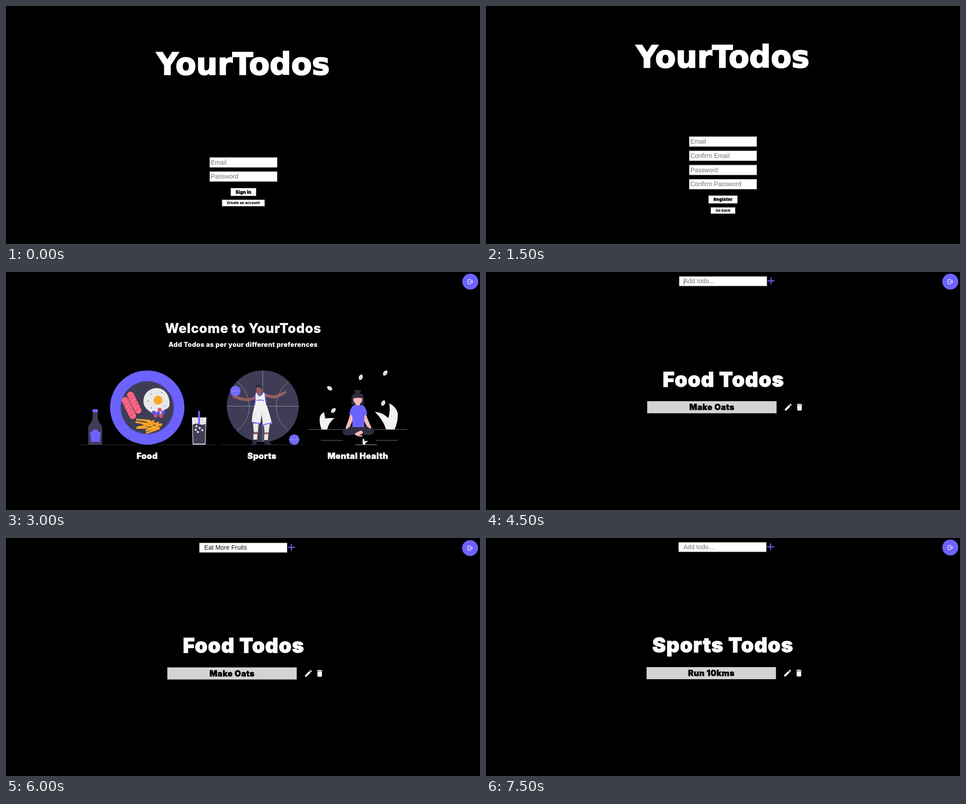
These frames come from a looping animation (1055 by 531 pixels, 8 s). An HTML page with a canvas:

```html
<!DOCTYPE html>
<html lang="en">
<head>
<meta charset="utf-8">
<title>Todo app tour</title>
<style>
  html, body { margin: 0; width: 100%; height: 100%; overflow: hidden; background: #000; }
  canvas { display: block; }
</style>
</head>
<body>
<canvas id="stage" width="1055" height="531"></canvas>
<script>
const ctx = document.getElementById('stage').getContext('2d');
const PURPLE = '#6c63ff', SLATE = '#3f3d56', INK = '#2f2e41', PALE = '#e8e8e8';
const PINK = '#ff6584', AMBER = '#f9a826', SKIN = '#ffb8b8', BROWN = '#965d61';
const HEAVY = 'Inter, "Open Sans", sans-serif';
const WIDE = '"DejaVu Sans", sans-serif';
const PLAIN = '"Liberation Sans", Arial, sans-serif';

function fill(d, color) {
  ctx.fillStyle = color;
  ctx.fill(new Path2D(d));
}

function line(d, color, width = 1, cap = 'butt') {
  ctx.strokeStyle = color;
  ctx.lineWidth = width;
  ctx.lineCap = cap;
  ctx.lineJoin = 'round';
  ctx.stroke(new Path2D(d));
}

function dot(x, y, r, color, ry = r) {
  ctx.fillStyle = color;
  ctx.beginPath();
  ctx.ellipse(x, y, r, ry, 0, 0, Math.PI * 2);
  ctx.fill();
}

function rect(x, y, w, h, color) {
  ctx.fillStyle = color;
  ctx.fillRect(x, y, w, h);
}

function box(x, y, w, h) {
  rect(x, y, w, h, '#a6a6a6');
  rect(x + 1, y + 1, w - 2, h - 2, '#fff');
}

function at(x, y, angle, scale, draw) {
  ctx.save();
  ctx.translate(x, y);
  ctx.rotate(angle);
  ctx.scale(scale, scale);
  draw();
  ctx.restore();
}

// Centred text, thickened by an outline given in em.
function thickText(text, x, y, size, color, outline) {
  ctx.textAlign = 'center';
  ctx.fillStyle = ctx.strokeStyle = color;
  ctx.lineWidth = size * outline;
  ctx.lineJoin = 'miter';
  ctx.miterLimit = 3;
  ctx.fillText(text, x, y);
  if (outline) ctx.strokeText(text, x, y);
}

function label(text, x, y, size, color = '#fff', weight = 900) {
  const gap = size * 0.026;
  ctx.font = `${weight} ${size}px ${HEAVY}`;
  ctx.letterSpacing = gap + 'px';
  thickText(text, x + gap / 2, y, size, color, weight === 900 ? 0.028 : 0.012);
  ctx.letterSpacing = '0px';
}

function brand(x, y) {
  const size = 67;
  ctx.font = `bold ${size}px ${WIDE}`;
  thickText('YourTodos', x, y, size, '#fff', 0.035);
}

function field(x, y, w, h, text, pad = 3, color = '#757575') {
  box(x, y, w, h);
  ctx.font = `13.9px ${PLAIN}`;
  ctx.textAlign = 'left';
  ctx.fillStyle = color;
  ctx.fillText(text, x + pad, y + h / 2 + 4.8);
}

function button(x, y, w, h, text, size, weight) {
  box(x, y, w, h);
  label(text, x + w / 2, y + h / 2 + size * 0.36, size, '#000', weight);
}

function signIn() {
  brand(527.8, 152.5);
  field(453, 337.5, 151, 23, 'Email');
  field(453, 369, 151, 23, 'Password');
  button(500, 406, 57, 18, 'Sign In', 9.8, 900);
  button(480.5, 432, 95.5, 15, 'Create an account', 7.8, 800);
}

function register() {
  brand(527, 137);
  ['Email', 'Confirm Email', 'Password', 'Confirm Password']
    .forEach((text, i) => field(452, 291 + i * 31.7, 151, 23, text));
  button(495, 422.7, 65, 18, 'Register', 9.5, 900);
  button(500, 449, 55, 14.6, 'Go back', 7.8, 800);
}

function logout(x, y) {
  dot(x, y, 17.8, PURPLE);
  at(x, y, 0, 1, () => {
    line('M1.2-2.8V-3.6Q1.2-4.6 .2-4.6H-4Q-5-4.6-5-3.6V3.8Q-5 4.8-4 4.8H.2Q1.2 4.8 1.2 3.8V3', '#fff', 1.2);
    line('M-1.6 .1H5.4M3-2.3L5.4 .1L3 2.5', '#fff', 1.2, 'round');
  });
}

function sausage(x, y) {
  at(x, y, -0.46, 1, () => {
    line('M0-19V19', PINK, 15, 'round');
    for (let i = -2; i <= 2; i++) line(`M-7 ${i * 8.5 + 1}Q0 ${i * 8.5 - 3} 7 ${i * 8.5 - 2}`, '#a8465f', 0.8);
    dot(-3, -12, 0.9, SLATE);
    dot(3, 4, 0.9, SLATE);
    dot(-2, 17, 0.9, SLATE);
  });
}

function food() {
  line('M162 385.5H466', '#302f40');

  fill('M193 313H204V324Q205 334 211 340Q214 344 214 350V382Q214 385 211 385H186Q183 385 183 382V350Q183 344 186 340Q192 334 193 324Z', SLATE);
  fill('M193.5 306H203.5Q204.5 306 204.5 307V313H192.5V307Q192.5 306 193.5 306Z', PURPLE);
  fill('M187 357H191.5A7.8 7.8 0 0 1 206.5 357H211L208.5 379H189.5Z', PURPLE);

  dot(314.4, 302.4, 82.7, PURPLE);
  dot(314.4, 302.4, 60, '#564fc8');
  dot(314.4, 302.6, 58.4, SLATE);
  sausage(285.5, 291.5);
  sausage(273.5, 303.5);

  fill('M334 259C349 258 361 270 363 284C366 297 363 304 356 306C350 307 352 313 346 316C337 320 325 316 317 309C309 303 305 295 306 286C307 271 319 260 334 259Z', PALE);
  dot(338.5, 286, 10, AMBER);
  [[324, 272], [347, 269], [323, 303], [316, 288], [353, 299]]
    .forEach(([x, y]) => dot(x, y, 1, SLATE));
  [[342, 307.5], [333, 320], [345, 321]].forEach(([x, y]) => dot(x, y, 4.5, '#d94f70'));
  [[329, 314], [338, 315.5], [350, 313.5]].forEach(([x, y]) => dot(x, y, 4.6, '#5d56dc'));

  [[306, 330.5, .08], [304, 337, .15], [309, 344, -.12], [306, 348, .02],
   [321, 335, .3], [325, 340, -.25], [318, 342, .25], [331, 339, .22],
   [332, 345, -.4], [326, 350, -.25], [327, 354, -.35], [316, 339, -.5]]
    .forEach(([x, y, a]) => at(x, y, a, 1, () => {
      rect(-16, -1.8, 32, 3.6, AMBER);
      rect(-16, 1.4, 32, 0.6, '#d88d1b');
    }));

  fill('M413.8 324.5H446L444 385H415.5Z', PALE);
  fill('M415.5 341Q422 336.5 430 339.5Q438 342 444.2 339L442.6 383H417Z', SLATE);
  rect(427.5, 310, 4.3, 29.5, PURPLE);
  [[424, 344, .1], [431, 348, .6], [422, 352, .8], [437, 353, .4], [427, 357, .5]]
    .forEach(([x, y, a]) => at(x, y, a, 1, () => rect(-2.1, -2.1, 4.2, 4.2, PALE)));
  [[420, 330], [437, 329], [441, 335], [422, 336]].forEach(([x, y]) => dot(x, y, 0.7, SLATE));
}

function ball(x, y) {
  dot(x, y, 11.5, PURPLE);
  at(x, y, 0, 1, () =>
    line('M0-11.5V11.5M-11.5 0H11.5M-8-8Q-1 0-8 8M8-8Q1 0 8 8', '#aaa5e8', 0.7));
}

function sports() {
  line('M477 385.5H662', '#302f40');
  dot(571.5, 299.5, 80, SLATE);
  line('M571.5 219.5V379.5M491.5 299.5H651.5M514 244Q541 267 541.5 299.5Q541 333 514 355M629 244Q602 267 601.5 299.5Q602 333 629 355', '#aaa9b4', 0.8);

  line('M559 278Q549 284 537 285Q523 284 509 278', BROWN, 6.5, 'round');
  line('M507 278L503 274M508 277L506 272', BROWN, 2.5, 'round');
  ball(510.5, 265.5);
  line('M576 275Q588 278 598 279Q609 275 617 271', BROWN, 6.5, 'round');
  line('M616 271L622 267M617 272L623 269', BROWN, 3, 'round');

  fill('M559 260H569V270L573 274L565 280L557 274Z', BROWN);
  fill('M550 336H564L562 350L559 377H550L551 355Z', BROWN);
  fill('M573 336H588L585 356L582 378H574L575 355Z', BROWN);
  fill('M550.5 362H559.5L558.5 375H551Z', PALE);
  fill('M575 362H584L582.5 376H574.5Z', PALE);
  fill('M550 338H562L560.5 357H551.5Z', PALE);
  fill('M574 338H587L584.5 358H575.5Z', PALE);
  fill('M551 374H558.5Q560 383 556 385H547.5Q548 379 551 374Z', INK);
  fill('M574.5 375H582Q587 379 591 384L590 385.5H577Q574 381 574.5 375Z', INK);

  fill('M557 268L560 273Q565 281 570 273L573 268L577 272Q578 289 580 303H552Q556 290 554 278Z', '#f0f0f0');
  line('M557 268L560 273Q565 281 570 273L573 268', PURPLE, 1.4);
  line('M554.5 276Q556 288 553 298M576.5 271Q577 284 579 294', PURPLE, 2);
  line('M558 287Q565 284 574 287', PURPLE, 2.2);
  fill('M554 297H580Q587 316 592 338L572 343L569 318L566 338L547 335Q548 314 554 297Z', '#f0f0f0');
  line('M547 335L566 338M572 341L592 336', PURPLE, 2.2);
  line('M569 308V322M551 326L556 313', '#c9c9d0', 0.7);

  dot(563.5, 262.5, 6.6, BROWN, 8);
  fill('M555 261Q553 252 562 250.5Q570 250 571 258L570.5 264Q568 257 562 257Q557 257 555 261Z', INK);
  ball(641.5, 374);
}

function leaf(x, y, angle) {
  at(x, y, angle, 1, () => {
    fill('M0 7C-6 3-5-4 0-7C5-4 6 3 0 7Z', '#f2f2f2');
    line('M0 8V-2', '#77777f', 0.8);
  });
}

function calm() {
  line('M673 351.5H893', '#77777b');
  line('M701 375.5H750M823 375.5H872', '#77777b');
  line('M777 385.5H826', '#b0b0b0');
  fill('M702 351Q696 333 699 322Q702 315 708 313Q709 321 711 327Q719 325 731 326Q718 336 715 351Z', '#f2f2f2');
  fill('M846 351Q840 331 821 312Q838 313 851 326Q856 309 853 293Q868 300 872 315Q873 333 865 351Z', '#f2f2f2');
  fill('M795 385Q792 377 795 371Q798 373 798 378Q801 376 806 377Q800 380 799 385Z', '#f2f2f2');
  leaf(720.5, 259.5, -0.95);
  leaf(789.5, 235, 0.35);
  leaf(844, 225.5, 0.65);
  leaf(728.5, 309, 0.75);
  leaf(839.5, 292.5, 0.45);

  dot(782.5, 268, 6, INK, 5);
  dot(777.5, 265.5, 2.5, INK);
  dot(787.5, 265.5, 2.5, INK);
  fill('M769 296V283Q769 270 783 270Q796.5 270 796.5 283V296Z', INK);
  fill('M778 290H788V299H778Z', SKIN);
  dot(783, 284.5, 10, SKIN);
  fill('M772 282Q773 273 783 273Q793 273 794 282Q783 279 772 282Z', INK);

  fill('M771 343H797Q812 344 818 350Q822 360 812 363Q797 365 783 359Q768 366 755 364Q747 361 750 352Q756 346 771 343Z', INK);
  fill('M768 311L776 315Q773 330 766 344L758 351L756 347Q763 330 768 311Z', SKIN);
  fill('M799 311L792 315Q795 330 803 344L811 350L813 346Q805 330 799 311Z', SKIN);
  fill('M775 297H793Q801 299 804 318L798 320L797 346H771L771 320L764 318Q767 300 775 297Z', PURPLE);
  line('M774 312L773 325M794 312L795 325', '#554dcc', 0.7);
  fill('M776 361Q784 355 791 354Q796 357 793 361L785 364Q791 363 795 366Q786 369 777 363Z', SKIN);
}

function welcome() {
  logout(1033.4, 21.5);
  label('Welcome to YourTodos', 527.5, 135.7, 29.3, '#fff', 800);
  label('Add Todos as per your different preferences', 527.5, 167, 14.5, '#fff', 800);
  food();
  sports();
  calm();
  label('Food', 314, 416.5, 18.4);
  label('Sports', 569.5, 416.5, 18.4);
  label('Mental Health', 783, 416.5, 18.4);
}

const PENCIL = 'M3 17.25V21h3.75L17.81 9.94l-3.75-3.75L3 17.25zM20.71 7.04a1 1 0 0 0 0-1.41l-2.34-2.34a1 1 0 0 0-1.41 0l-1.83 1.83 3.75 3.75 1.83-1.83z';
const BIN = 'M6 19c0 1.1.9 2 2 2h8c1.1 0 2-.9 2-2V7H6v12zM19 4h-3.5l-1-1h-5l-1 1H5v2h14V4z';

function todos(title, item, dx, dy, entry) {
  field(429.6 + dx, 9.6 + dy, 196, 22, entry || 'Add todo...', 11.2, entry ? '#111' : '#757575');
  const px = 634.7 + dx, py = 19.9 + dy;
  line(`M${px - 7.8} ${py}H${px + 7.8}M${px} ${py - 7.8}V${py + 7.8}`, PURPLE, 2.2);
  label(title, 528 + dx, 255.5 + dy * 0.6, 45);
  rect(358.7 + dx, 288.2 + dy * 0.5, 288, 27, '#d3d3d3');
  label(item, 502.6 + dx, 308 + dy * 0.5, 18.2, '#000');
  at(662.6 + dx, 291.4 + dy * 0.5, 0, 0.84, () => fill(PENCIL, '#fff'));
  at(687.7 + dx, 291.4 + dy * 0.5, 0, 0.84, () => fill(BIN, '#fff'));
}

function foodEmpty() {
  logout(1033.4, 21.5);
  todos('Food Todos', 'Make Oats', 0, 0);
  rect(440.4, 13, 1, 15.5, '#333');
}

function foodTyped() {
  logout(1032.9, 22.5);
  todos('Food Todos', 'Make Oats', 0.4, 1, 'Eat More Fruits');
}

function sportsEmpty() {
  logout(1033.4, 21.2);
  todos('Sports Todos', 'Run 10kms', -1.3, -0.3);
}

const scenes = [signIn, register, welcome, foodEmpty, foodTyped, sportsEmpty];
const HOLD = 1500, LOOP = 8000;

function frame() {
  const t = performance.now() % LOOP;
  rect(0, 0, 1055, 531, '#000');
  scenes[Math.floor(t / HOLD)]();
  requestAnimationFrame(frame);
}
frame();
</script>
</body>
</html>
```
